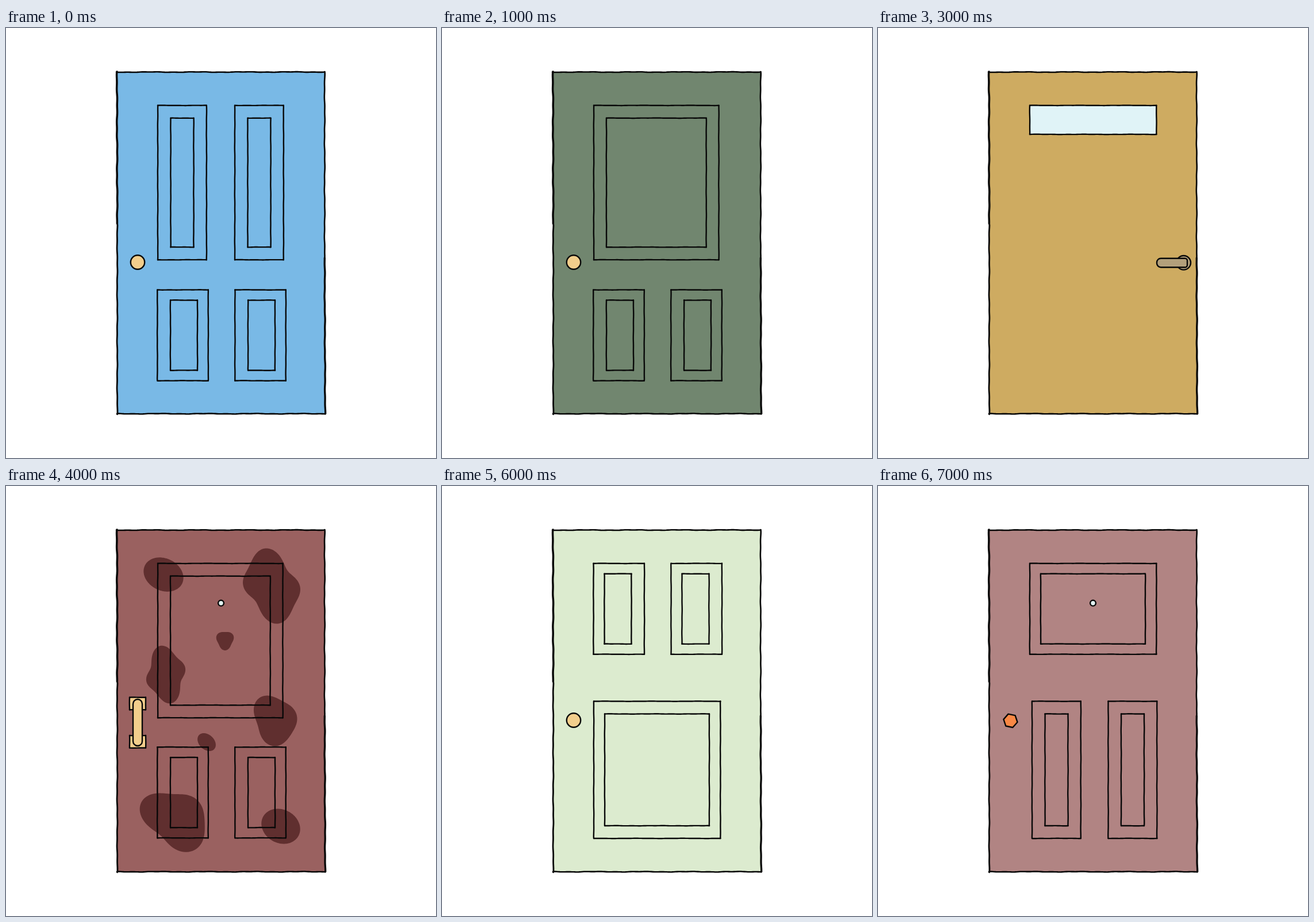
Recreate the animation shown at these times as an HTML page with a canvas. Size 748 by 748 pixels, loop 8000 ms.

```html
<!DOCTYPE html>
<html lang="en">
<head>
<meta charset="utf-8">
<title>Doors</title>
<style>
  html, body { margin: 0; width: 100%; height: 100%; overflow: hidden; background: #fff; }
  canvas { display: block; }
</style>
</head>
<body>
<canvas id="stage" width="748" height="748"></canvas>
<script>
const ctx = document.getElementById('stage').getContext('2d');
const INK = '#080808', GLASS = '#e0f3f7', BRASS = '#f2ce8c', STAIN = '#602f2f';
const TOP = 134.7, BOTTOM = 613;
const SHORT = 158, MEDIUM = 238.5, LONG = 268.5;
const HOLD = 1000;

// Uneven pen line; the waver depends only on the end points.
function penLine(x0, y0, x1, y1, width = 2.4, waver = 0.25) {
  const length = Math.hypot(x1 - x0, y1 - y0);
  const ux = (x1 - x0) / length, uy = (y1 - y0) / length;
  const seed = x0 * 1.7 + y0 * 2.3;
  ctx.beginPath();
  ctx.moveTo(x0, y0);
  for (let d = 3; d < length; d += 3) {
    const off = waver * (0.6 * Math.sin(d / 13 + seed) + 0.4 * Math.sin(d / 4.3 + seed * 2));
    ctx.lineTo(x0 + ux * d - uy * off, y0 + uy * d + ux * off);
  }
  ctx.lineTo(x1, y1);
  ctx.lineWidth = width;
  ctx.stroke();
}

function box(x, y, w, h, fill = 'transparent') {
  ctx.fillStyle = fill;
  ctx.fillRect(x, y, w, h);
  penLine(x, y, x + w, y);
  penLine(x + w, y, x + w, y + h);
  penLine(x + w, y + h, x, y + h);
  penLine(x, y + h, x, y);
}

function panel(x, y, w, h, left, innerWidth, inset) {
  box(x, y, w, h);
  box(x + left, y + inset, innerWidth, h - 2 * inset);
}

function shortPair(x, y, left) {
  for (const dx of [0, 135]) panel(x + dx, y, 88.5, SHORT, left, 47, 18);
}

const upperPair = x => shortPair(x, TOP, 19);
const lowerPair = y => shortPair(263.3, y, 22.7);

function longPair(x, gap, y, h) {
  for (const dx of [0, gap]) panel(x + dx, y, 84.8, h, 22.5, 40, 22);
}

const largePanel = () => panel(264, TOP, 217.5, LONG, 22, 173.7, 22);
const widePanel = (y, h, inset) => panel(264, y, 220.3, h, 19, 182, inset);

function shape(fill, trace) {
  ctx.beginPath();
  trace();
  ctx.fillStyle = fill;
  ctx.fill();
  ctx.lineWidth = 2.4;
  ctx.stroke();
}

const disc = (x, y, r, fill) => shape(fill, () => ctx.arc(x, y, r, 0, Math.PI * 2));
const knob = fill => disc(229, 407.5, 12.2, fill);
const peephole = () => disc(374, 203.7, 4.9, '#e2f3f2');

function hexKnob(fill) {
  shape(fill, () => {
    for (let i = 0; i < 6; i++) {
      const a = 0.2 + i * Math.PI / 3;
      ctx.lineTo(230.5 + 12.3 * Math.cos(a), 408.3 + 12.3 * Math.sin(a));
    }
    ctx.closePath();
  });
}

function lever(fill) {
  disc(531.7, 408.3, 12.3, fill);
  shape(fill, () => ctx.roundRect(485, 400.7, 53, 15.5, [7, 4, 4, 7]));
}

function pullHandle() {
  for (const y of [367.7, 434]) box(215, y, 28, 21.5, BRASS);
  shape(BRASS, () => ctx.roundRect(221, 371, 16, 81, 8));
}

// Tilted ellipse whose radius swells in a number of lobes.
function stain(x, y, a, b, tilt, lobes = 0, swell = 0, phase = 0) {
  ctx.beginPath();
  for (let t = 0; t < Math.PI * 2; t += 0.05) {
    const ellipse = a * b / Math.hypot(b * Math.cos(t - tilt), a * Math.sin(t - tilt));
    const r = ellipse * (1 + swell * Math.cos(lobes * (t - phase)));
    ctx.lineTo(x + r * Math.cos(t), y + r * Math.sin(t));
  }
  ctx.fillStyle = STAIN;
  ctx.fill();
}

function stains() {
  stain(274, 154, 36, 28, 0.45);
  stain(462, 174, 64, 42, 1.13, 4, 0.11);
  stain(381, 268, 16, 14.5, 1.57, 3, 0.12, 1.57);
  stain(278, 328, 47, 31, 1.57, 4, 0.12, -0.31);
  stain(468, 407, 44, 35, 1.2, 3, 0.1, 1.83);
  stain(349, 445.5, 18, 13, 0.75);
  stain(296, 580, 62, 44, 0.62, 3, 0.12, -0.77);
  stain(478, 592, 35, 29, 0.5);
}

const doors = [
  ['#79b9e6', () => {
    longPair(264, 134, TOP, LONG);
    lowerPair(455.5);
    knob(BRASS);
  }],
  ['#71866f', () => {
    largePanel();
    lowerPair(455.5);
    knob(BRASS);
  }],
  ['#84756d', () => {
    shortPair(262.5, 133, 19);
    widePanel(BOTTOM - MEDIUM, MEDIUM, 22);
    lever('#636363');
  }],
  ['#ceab61', () => {
    box(264, TOP, 220.3, 50.3, GLASS);
    lever('#b3a07b');
  }],
  ['#9a6160', () => {
    stains();
    largePanel();
    lowerPair(454.2);
    peephole();
    pullHandle();
  }],
  ['#fbe9b2', () => {
    upperPair(263.5);
    longPair(268, 132.5, BOTTOM - LONG, LONG);
    knob('#f1cb88');
  }],
  ['#dcebcf', () => {
    upperPair(263.5);
    widePanel(BOTTOM - MEDIUM, MEDIUM, 22);
    knob(BRASS);
  }],
  ['#b18483', () => {
    widePanel(TOP, SHORT, 18);
    longPair(268, 132.5, BOTTOM - MEDIUM, MEDIUM);
    peephole();
    hexKnob('#f98845');
  }],
];

function outline() {
  penLine(192, 76.7, 554.5, 76.5, 2.6, 0.5);
  penLine(193, 671, 556, 671, 2.6, 0.5);
  penLine(193, 76, 193.5, 340, 3.5, 0.6);
  penLine(193.5, 340, 193.5, 672, 2.8, 0.5);
  penLine(554.3, 76, 554.3, 400, 2.6, 0.5);
  penLine(554.3, 400, 555.2, 671, 3.3, 0.5);
}

function drawDoor([color, details]) {
  ctx.clearRect(0, 0, 748, 748);
  ctx.fillStyle = color;
  ctx.fillRect(193.5, 76.7, 361, 594.3);
  ctx.strokeStyle = INK;
  ctx.lineCap = ctx.lineJoin = 'round';
  details();
  outline();
}

let shown = -1;
function tick() {
  const index = Math.floor(performance.now() / HOLD) % doors.length;
  if (index !== shown) drawDoor(doors[shown = index]);
  requestAnimationFrame(tick);
}
tick();
</script>
</body>
</html>
```
